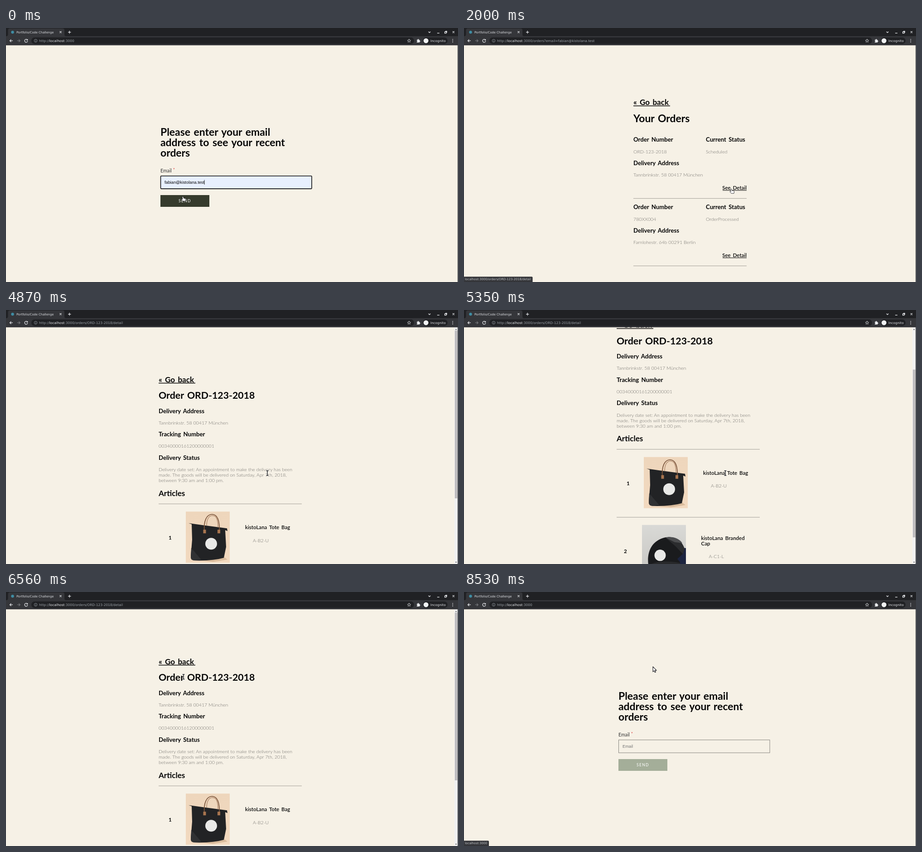
An HTML page that plays this animation: 998 px wide and 561 px high, repeating every 8610 ms.

```html
<!DOCTYPE html>
<html lang="en">
<head>
<meta charset="utf-8">
<title>Portfolio/Code Challenge</title>
<style>
  html, body { margin: 0; width: 100%; height: 100%; overflow: hidden; background: #f6f1e6; }
  svg { display: block; width: 100vw; height: 100vh; }
  text { white-space: pre; }
  .ui { font: 6.7px "DejaVu Sans", sans-serif; fill: #dfe1e5; }
  .url { font-size: 7.45px; fill: #9aa0a6; }
  .url .host { fill: #e8eaed; }
  .page { font-family: Lato, sans-serif; fill: #060606; word-spacing: .13em; }
  .h1 { font-size: 22.9px; font-weight: 700; }
  .h1.order { font-size: 21.3px; }
  .h2 { font-size: 17.1px; font-weight: 700; }
  .h3 { font-size: 13.2px; font-weight: 700; }
  .count { font-size: 11.5px; font-weight: 700; }
  .link { font-size: 11.5px; font-weight: 600; }
  .body { font-size: 10.6px; font-weight: 300; fill: #6c6a66; word-spacing: 0; }
  .field { font: 9.2px "Liberation Sans", Arial, sans-serif; word-spacing: 0; }
  .rule { stroke: #8d8a83; stroke-width: .8; }
  .icon { fill: none; stroke: #e8eaed; stroke-width: 1.2; }
</style>
</head>
<body>
<svg viewBox="0 0 998 561" preserveAspectRatio="none">
  <defs>
    <linearGradient id="peach" x2="0" y2="1">
      <stop stop-color="#eed6bc"/><stop offset="1" stop-color="#f2d9bf"/>
    </linearGradient>
    <linearGradient id="wall" x2="0" y2="1">
      <stop stop-color="#d9d9d6"/><stop offset="1" stop-color="#c6c5c1"/>
    </linearGradient>
    <g id="bag">
      <path fill="url(#peach)" d="M0 0H97V113H0Z"/>
      <path fill="#d9bb9c" d="M12 106L84 100 92 106 60 111Z"/>
      <path fill="#222325" d="M6 25.5L38 30 91 37 92 43 87 41 89 78 84 102Q60 109 20 108 11 107 11 99L14 62 13 28Z"/>
      <path fill="#303133" d="M12 80Q22 92 34 106L18 108Q10 107 11 99Z"/>
      <g fill="none" stroke="#7d573d" stroke-width="1.8">
        <path d="M41 44C39 20 46 6 58 6S75 20 74 44"/>
        <path d="M46 31C46 18 50 9 59 9S71 18 71 35" stroke="#a07658" stroke-width="1.1"/>
      </g>
      <path fill="#a8754f" d="M38.5 40H44.5V48H38.5ZM70 40H76V48H70Z"/>
      <circle cx="56" cy="71" r="13" fill="#e9e9e7"/>
    </g>
    <g id="cap">
      <path fill="url(#wall)" d="M0 0H97V113H0Z"/>
      <path fill="#8c6850" d="M0 98L97 95V113H0Z"/>
      <path fill="#1c2440" d="M80 51H97V98L70 101Z"/>
      <path fill="#1a1b1d" d="M14 88C11 64 18 38 46 29 66 22 88 31 94 53L90 64 78 75 84 82 84 93Q60 104 22 102Z"/>
      <path fill="#2b2c2e" d="M52 28C68 24 87 32 94 53L90 64 75 48Z"/>
      <path fill="#4c4d4f" d="M52 28C66 24 82 29 89 40L72 38Z"/>
      <path fill="#28292b" d="M14 88Q45 76 84 84L84 93Q55 102 24 102 15 99 14 88Z"/>
      <circle cx="40" cy="67" r="12.5" fill="#e9e9e7"/>
    </g>
    <g id="goBack">
      <text class="h2" y="12">« Go back</text>
      <path d="M0 14H81" stroke="#060606" stroke-width="1.4"/>
    </g>
    <path id="beam" d="M-2.4 -5H2.4M0 -5V5.5M-2.4 5.5H2.4"/>
  </defs>

  <path fill="#f6f1e6" d="M0 0H998V561H0Z"/>

  <g class="page" id="form">
    <text class="h1" x="341" y="238">Please enter your email</text>
    <text class="h1" x="341" y="261">address to see your recent</text>
    <text class="h1" x="341" y="284">orders</text>
    <text x="341" y="318.5" font-size="10.5" fill="#333">Email</text>
    <text x="369" y="316" font-size="9" fill="#d22">*</text>
    <g id="filled">
      <rect x="341.5" y="326.7" width="333.6" height="28.4" rx="1.5" fill="#e8f0fe" stroke="#101010" stroke-width="1.6"/>
      <text class="field" x="350" y="344">fabian@kistolana.test</text>
      <path id="caret" d="M438 335.5V346" stroke="#000" stroke-width=".8"/>
    </g>
    <g id="empty">
      <rect x="341.5" y="326.7" width="333.6" height="28.4" fill="none" stroke="#85837d"/>
      <text class="field" x="350" y="344" fill="#757575">Email</text>
    </g>
    <rect id="send" x="341" y="369" width="108" height="26"/>
    <text x="381" y="384.5" font-size="8.6" letter-spacing="1.3" fill="#fff">SEND</text>
  </g>

  <g class="page" id="orders">
    <use href="#goBack" x="374" y="158"/>
    <text class="h1" x="374" y="207.5">Your Orders</text>
    <g id="cards"></g>
  </g>

  <g id="detail">
    <g class="page" id="scroller">
      <use href="#goBack" x="337" y="147.5"/>
      <text class="h1 order" x="337" y="196">Order ORD-123-2018</text>
      <text class="h3" x="337" y="227.5">Delivery Address</text>
      <text class="body" x="337" y="252.7">Tannbrinkstr. 58 00417 München</text>
      <text class="h3" x="337" y="279">Tracking Number</text>
      <text class="body" x="337" y="304.2">00340000161200000001</text>
      <text class="h3" x="337" y="330.7">Delivery Status</text>
      <text class="body" x="337" y="356">Delivery date set: An appointment to make the delivery has been</text>
      <text class="body" x="337" y="368">made. The goods will be delivered on Saturday, Apr 7th, 2018,</text>
      <text class="body" x="337" y="380">between 9:30 am and 1:00 pm.</text>
      <text class="h2" x="337" y="410.5">Articles</text>
      <path class="rule" d="M337 428.2H653"/>
      <g data-shift="-26.5">
        <text class="count" x="359" y="507">1</text>
        <text class="link" x="528" y="484">kistoLana Tote Bag</text>
        <text class="body" x="545" y="512.5">A-B2-U</text>
      </g>
      <path class="rule" data-shift="-53" d="M337 578.3H653"/>
      <g data-shift="-73.5">
        <text class="count" x="353" y="657">2</text>
        <text class="link" x="523.5" y="628">kistoLana Branded</text>
        <text class="link" x="523.5" y="640">Cap</text>
        <text class="body" x="540.5" y="668.5">A-C1-L</text>
      </g>
      <path class="rule" data-shift="-94" d="M337 728.3H653"/>
      <g id="photos">
        <use href="#bag" x="397" y="445.3"/>
        <use href="#cap" x="393" y="595.3"/>
      </g>
    </g>
    <path fill="#f1f1f1" d="M990 38H997V561H990Z"/>
    <rect id="thumb" x="991" width="5.5" fill="#bdbcbe"/>
    <path fill="#555" d="M992 44L993.7 41.5 995.4 44ZM992 556L993.7 558.5 995.4 556Z"/>
  </g>

  <path fill="#4a4b4e" d="M997 38H998V561H997Z"/>

  <g class="ui" id="browser">
    <path fill="#202124" d="M0 0H998V19H0Z"/>
    <path fill="#35363a" d="M0 18H998V38.3H0ZM1 18Q4.5 18 4.5 14V5Q4.5 1 8.5 1H125Q129 1 129 5V14Q129 18 132 18Z"/>
    <circle cx="14.5" cy="9.2" r="3.2" fill="#3f8da3"/>
    <text x="23" y="11.6">Portfolio/Code Challenge</text>
    <path class="icon" d="M118.5 7.2L122.5 11.2M122.5 7.2L118.5 11.2M137 9.3H143.4M140.2 6.1V12.5"/>
    <path class="icon" d="M932.7 8L935 10.3 937.3 8M952 11.3H957M968.6 8.4H972V11.6H968.6ZM970 7.2H973.3V10.4M986 7.2L990 11.2M990 7.2L986 11.2"/>
    <path class="icon" d="M14.8 28.2H8.4M11.4 25.2L8.4 28.2 11.4 31.2M47 26A3.4 3.4 0 1 0 47.8 29"/>
    <path fill="#e8eaed" d="M48.2 24.2V27.6H44.8Z"/>
    <path class="icon" style="stroke:#77787c" d="M24.8 28.2H31.2M28.2 25.2L31.2 28.2 28.2 31.2"/>
    <rect x="56" y="20.7" width="845" height="14.8" rx="7.4" fill="#202124"/>
    <circle class="icon" style="stroke:#9aa0a6;stroke-width:.8" cx="65.5" cy="28.1" r="3.3"/>
    <path fill="#9aa0a6" d="M65.1 25.9H65.9V26.7H65.1ZM65.1 27.4H65.9V30.3H65.1Z"/>
    <text class="url" x="73" y="30.8">http://<tspan class="host">localhost</tspan><tspan id="path"></tspan></text>
    <path class="icon" style="stroke-width:.8" d="M890 24.4L891.1 26.9 893.7 27.1 891.7 28.8 892.3 31.4 890 30 887.7 31.4 888.3 28.8 886.3 27.1 888.9 26.9Z"/>
    <path fill="#e8eaed" d="M907 26H909Q908.8 24.2 910.2 24.2T911.4 26H913.3V28Q914.8 27.8 914.8 29T913.3 30.2V32H907V30Q908.4 30 908.4 29T907 28Z"/>
    <rect x="920.5" y="21" width="54.5" height="14.2" rx="7.1" fill="#202124"/>
    <circle cx="927.3" cy="28.1" r="5.4" fill="#f1f3f4"/>
    <text x="937" y="30.8" font-size="7.3">Incognito</text>
    <path fill="#e8eaed" d="M985.6 24.4h1.5v1.5h-1.5zM985.6 27.4h1.5v1.5h-1.5zM985.6 30.4h1.5v1.5h-1.5z"/>
  </g>

  <g class="ui" id="status">
    <rect id="bubble" x="-3" y="549.3" height="15" rx="2" fill="#35363a"/>
    <text id="statusText" x="2" y="557.4" fill="#c3c6ca"></text>
  </g>

  <g id="cursor" stroke-linejoin="round">
    <path id="arrow" fill="#fff" stroke="#16161c" stroke-width="1.1" d="M.6 .8V12.2L3.2 9.9 5 13.6 6.9 12.7 5.1 9.1H8.6Z"/>
    <path id="hand" fill="#fff" stroke="#16161c" stroke-width=".8" d="M-1.4 1Q-.2 -.4 .9 1L1.8 4 5.4 4.6Q6.8 5 6.6 6.5L6 10.3H.2L-3 6.8Q-3 5.4 -1.6 5.8L-.5 6.4Z"/>
    <g id="ibeam" fill="none">
      <use href="#beam" stroke="#fff" stroke-width="2.8"/>
      <use href="#beam" stroke="#222" stroke-width="1.5"/>
    </g>
  </g>
</svg>

<script>
const LOOP = 8610, STEP = 80;
const $ = id => document.getElementById(id);
const show = (id, on) => { $(id).style.display = on ? '' : 'none'; };

const orderCard = (dy, number, state, address) => `
  <g transform="translate(0 ${dy})">
    <text class="h3" x="374" y="251">Order Number</text>
    <text class="h3" x="534" y="251">Current Status</text>
    <text class="body" x="374" y="276.7">${number}</text>
    <text class="body" x="534" y="276.7">${state}</text>
    <text class="h3" x="374" y="302.5">Delivery Address</text>
    <text class="body" x="374" y="328">${address}</text>
    <text class="link" x="624" y="356.7" text-anchor="end">See Detail</text>
    <path d="M571 358.7H624" stroke="#060606"/>
    <path class="rule" d="M374 376.4H624"/>
  </g>`;
$('cards').innerHTML =
  orderCard(0, 'ORD-123-2018', 'Scheduled', 'Tannbrinkstr. 58 00417 München') +
  orderCard(149, '780XX004', 'OrderProcessed', 'Farnlohestr. 64b 00291 Berlin');

const HOME = ':3000';
const ORDERS = ':3000/orders?email=fabian@kistolana.test';
const DETAIL = ':3000/orders/ORD-123-2018/detail';

// Tracks that switch hard: [time, value]
const pages = [[0, 'form'], [730, ''], [800, 'orders'], [3910, ''], [3990, 'detail'],
  [7200, ''], [7270, 'orders'], [8290, ''], [8370, 'form']];
const paths = [[0, HOME], [800, ORDERS], [3990, DETAIL], [7270, ORDERS], [8370, HOME]];
const pointers = [[0, 'hand'], [730, 'arrow'], [1530, 'hand'], [3910, 'arrow'], [4230, 'ibeam'],
  [5920, 'arrow'], [6560, 'ibeam'], [6950, 'arrow'], [7030, 'hand'], [8530, 'arrow']];
const statuses = [[0, '', 0], [880, 'Establishing secure connection...', 331],
  [1900, 'localhost' + DETAIL, 151.5], [5000, 'localhost' + HOME, 55]];

// Tracks that move: [time, ...values]
const cursorPath = [[0, 390.5, 372], [230, 392.5, 376], [1210, 392.5, 376], [1530, 582, 347],
  [1690, 590, 355], [4150, 590, 355], [4470, 584, 360], [4630, 584, 360], [4870, 577, 360],
  [5840, 577, 360], [5920, 574.5, 360], [6400, 574.5, 360], [6560, 392, 187], [6870, 392, 178],
  [7030, 393, 158], [7430, 393, 158], [7960, 416.5, 164], [LOOP, 416.5, 164]];
const scrollPath = [[0, 0], [4950, 0], [5350, 120.5], [5590, 180], [6080, 180], [6480, 0], [LOOP, 0]];
const statusFade = [[0, 0], [800, 0], [880, 1], [1050, 1], [1290, 0], [1840, 0], [2000, 1],
  [4150, 1], [4470, 0], [7260, 0], [7340, 1], [LOOP, 1]];

const held = (track, t) => track.filter(k => k[0] <= t).pop();

function moving(track, t) {
  const i = track.findIndex(k => k[0] > t);
  const [t0, ...from] = track[i - 1], [t1, ...to] = track[i];
  const p = Math.floor((t - t0) / STEP) * STEP / (t1 - t0);
  return from.map((v, n) => v + (to[n] - v) * p);
}

function draw(t) {
  const page = held(pages, t)[1];
  for (const id of ['form', 'orders', 'detail']) show(id, id === page);
  $('path').textContent = held(paths, t)[1];

  const filled = t < 8000;
  show('filled', filled);
  show('empty', !filled);
  show('caret', t < 390);
  $('send').setAttribute('fill', filled ? '#363b2d' : '#a4ae99');

  const loaded = t >= 4310;
  const [scroll] = moving(scrollPath, t);
  $('scroller').setAttribute('transform', `translate(0 ${-scroll})`);
  show('photos', loaded);
  for (const el of document.querySelectorAll('[data-shift]'))
    el.setAttribute('transform', `translate(0 ${loaded ? 0 : el.dataset.shift})`);
  $('thumb').setAttribute('y', 45.5 + scroll * .715);
  $('thumb').setAttribute('height', loaded ? 370.5 : 435);

  const [, label, width] = held(statuses, t);
  $('statusText').textContent = label;
  $('bubble').setAttribute('width', width + 3);
  $('status').style.opacity = moving(statusFade, t)[0];

  const [x, y] = moving(cursorPath, t);
  $('cursor').setAttribute('transform', `translate(${x} ${y})`);
  const pointer = held(pointers, t)[1];
  for (const id of ['arrow', 'hand', 'ibeam']) show(id, id === pointer);
}

const start = performance.now();
function tick() {
  draw((performance.now() - start) % LOOP);
  requestAnimationFrame(tick);
}
tick();
</script>
</body>
</html>
```
